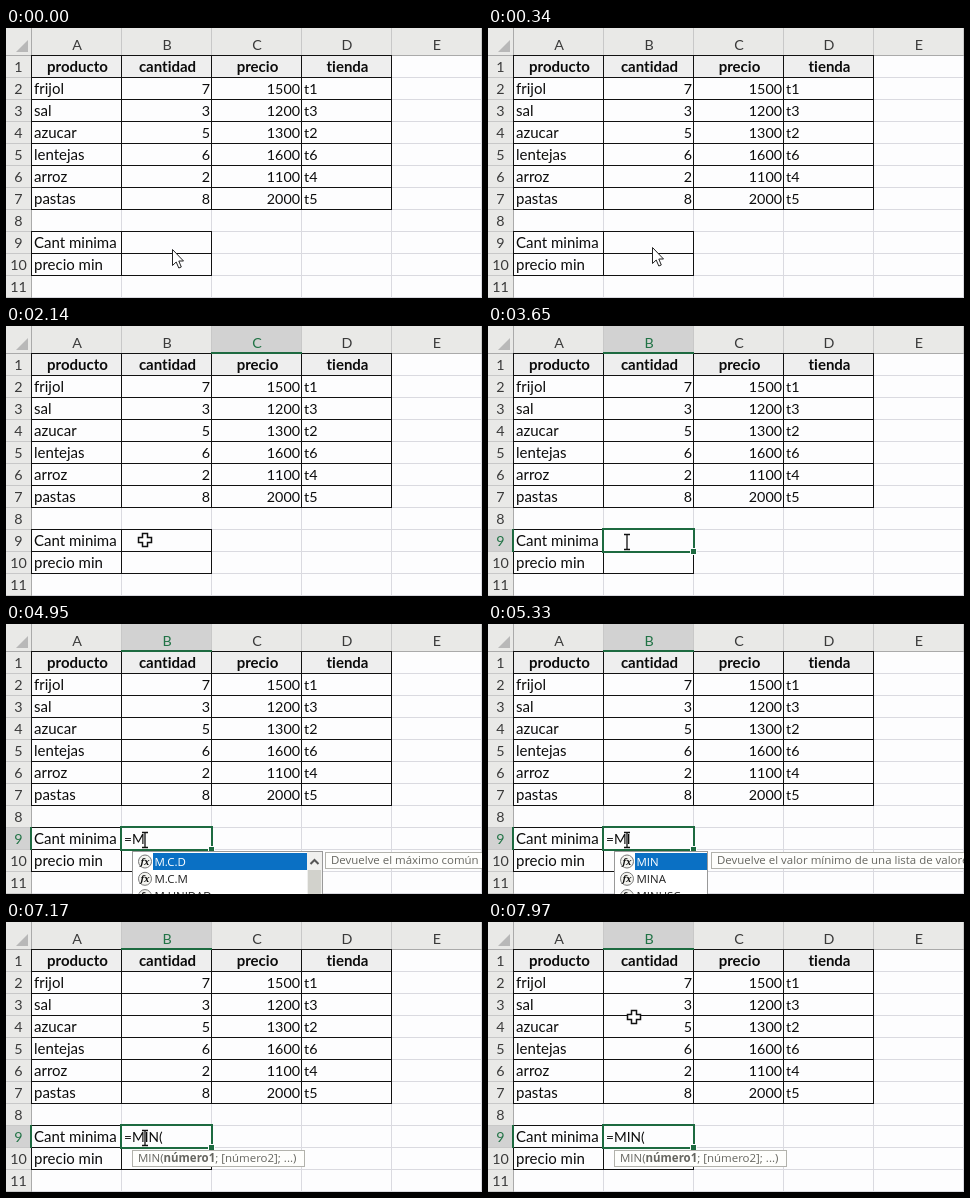
Recreate the animation shown at these times as an HTML page. Size 476x270 px, loop 8000 ms.

```html
<!DOCTYPE html>
<html lang="es">
<head>
<meta charset="utf-8">
<title>Función MIN</title>
<style>
  html, body { margin: 0; width: 100%; height: 100%; overflow: hidden; background: #fdfdfe; }
  svg { display: block; width: 476px; height: 270px; }
  text { font-family: Lato, sans-serif; font-size: 15px; font-variant-ligatures: none; fill: #0c0c0c; white-space: pre; }
  .num { font-size: 14.3px; }
  .head { font-size: 14.3px; fill: #3a3a3a; }
  .on { fill: #217346; }
  .bold { font-weight: 700; }
  .typed { font-size: 13.7px; }
  .ui, .tip { font-family: "Open Sans", sans-serif; font-size: 11.46px; fill: #222; }
  .tip { fill: #666660; }
  .fx { font-family: "Noto Serif", serif; font-size: 9px; font-style: italic; font-weight: 700; }
</style>
</head>
<body>
<svg id="stage" viewBox="0 0 476 270"></svg>
<script>
const LOOP = 8000;
const LEFT = 25, TOP = 27, COL = 90, ROW = 22;
const PAPER = '#fdfdfe', HEADER = '#e9e9e7', TITLES = '#eeeeee', ACTIVE = '#d2d2d2';
const GRID = '#dadae0', GREEN = '#1d6a40';
const colX = c => LEFT + c * COL;
const rowY = r => TOP + r * ROW;
const baseline = r => rowY(r) + 17;

const rect = (x, y, w, h, fill, extra = '') =>
  `<rect x="${x}" y="${y}" width="${w}" height="${h}" fill="${fill}" ${extra}/>`;
const text = (x, y, str, cls = '', anchor = 'start') =>
  `<text x="${x}" y="${y}" class="${cls}" text-anchor="${anchor}">${str}</text>`;
const during = (from, to, body) => `<g data-from="${from}" data-to="${to}">${body}</g>`;
const hline = (x, y, w, color) => rect(x, y, w, 1, color);
const vline = (x, y, h, color) => rect(x, y, 1, h, color);

function columnHead(c, active) {
  const x = colX(c);
  return rect(x + 1, 0, COL - 1, TOP, active ? ACTIVE : HEADER) +
    (active ? rect(x, TOP - 1, COL + 1, 2, GREEN) : '') +
    text(x + COL / 2 + 1, 22, 'ABCDE'[c], 'head' + (active ? ' on' : ''), 'middle');
}

function rowHead(r, active) {
  const y = rowY(r);
  return rect(0, y + 1, LEFT, ROW - 1, active ? ACTIVE : HEADER) +
    (active ? rect(LEFT - 1, y, 2, ROW + 1, GREEN) : '') +
    text(12.5, baseline(r), r + 1, 'head' + (active ? ' on' : ''), 'middle');
}

function borders(c0, r0, cols, rows) {
  let out = '';
  for (let r = 0; r <= rows; r++) out += hline(colX(c0), rowY(r0 + r), cols * COL + 1, '#111');
  for (let c = 0; c <= cols; c++) out += vline(colX(c0 + c), rowY(r0), rows * ROW + 1, '#111');
  return out;
}

function sheet() {
  let out = rect(0, 0, 476, 270, PAPER) + rect(0, 0, 476, TOP, '#c8c8c8') + rect(0, 0, LEFT, 270, '#c8c8c8');
  out += rect(0, 0, LEFT, TOP, HEADER) + '<path d="M22 12V24H10Z" fill="#b8b8b8"/>';
  for (let r = 0; r <= 11; r++) out += hline(LEFT, rowY(r), 451, GRID);
  for (let c = 0; c <= 5; c++) out += vline(colX(c), TOP, 243, GRID);
  for (let c = 0; c < 5; c++) out += columnHead(c);
  for (let r = 0; r < 11; r++) out += rowHead(r);
  out += hline(0, TOP, 476, '#aaa') + vline(LEFT, 0, 270, '#aaa');
  out += rect(LEFT, TOP, 4 * COL, ROW, TITLES) + borders(0, 0, 4, 7) + borders(0, 8, 2, 2);

  ['producto', 'cantidad', 'precio', 'tienda'].forEach((title, c) => {
    out += text(colX(c) + 46.5, baseline(0), title, 'bold', 'middle');
  });
  const items = [
    ['frijol', 7, 1500, 't1'], ['sal', 3, 1200, 't3'], ['azucar', 5, 1300, 't2'],
    ['lentejas', 6, 1600, 't6'], ['arroz', 2, 1100, 't4'], ['pastas', 8, 2000, 't5']
  ];
  items.forEach(([name, amount, price, shop], i) => {
    const y = baseline(i + 1);
    out += text(28, y, name) + text(204, y, amount, 'num', 'end') +
      text(294, y, price, 'num', 'end') + text(298, y, shop, 'num');
  });
  return out + text(28, baseline(8), 'Cant minima') + text(28, baseline(9), 'precio min');
}

const selection = () =>
  rect(0, 0, COL + 1, ROW + 1, 'none', `stroke="${GREEN}" stroke-width="2"`) +
  rect(87, 19, 7, 7, PAPER) + rect(88, 20, 5, 5, GREEN);

function suggestions(right, names, scroll) {
  const x = 126, end = scroll ? right - 15 : right;
  let out = rect(x + .5, 227.5, right - x, 50, '#fff', 'stroke="#999"');
  out += rect(x + 21, 229, end - x - 21, 17, '#0a70c4');
  names.forEach((name, i) => {
    const y = 237.5 + i * 17.3;
    out += `<circle cx="${x + 13}" cy="${y}" r="6.5" fill="#f4f4f0" stroke="#777"/>` +
      text(x + 13, y + 3, 'fx', 'fx', 'middle') +
      `<text x="${x + 22.5}" y="${y + 4.2}" class="ui"${i ? '' : ' style="fill:#fff"'}>${name}</text>`;
  });
  if (scroll) {
    out += rect(end, 228, 15, 42, '#f0f0ee') +
      `<path d="M${end + 3.5} 240l4-4 4 4" fill="none" stroke="#555" stroke-width="2"/>` +
      rect(end + 1, 246, 13, 24, '#d2d2cc');
  }
  return out;
}

const tip = (x, w, str) =>
  rect(x + .5, 228.5, w, 16, '#fefefc', 'stroke="#b2b2ac"') + text(x + 6, 240, str, 'tip');

function typed() {
  const keys = [['=', 3900], ['M', 4780], ['I', 5300], ['N', 5800], ['(', 6850]];
  const spans = keys.map(([ch, at]) => `<tspan data-from="${at}" data-to="${LOOP}">${ch}</tspan>`).join('');
  return text(118, baseline(8), spans, 'typed') +
    during(3900, 4280, vline(127, 207, 15, '#111'));
}

const arrow = '<path d="M.5 .5V16.5L4.2 13 6.8 19 9.3 18 6.8 12H11.5Z" fill="#fff" stroke="#222"/>';
const cross = '<path d="M-2.5-6.5h5v4h4v5h-4v4h-5v-4h-4v-5h4z" fill="#fff" stroke="#111" stroke-width="1.5"/>';
const beam = '<path d="M-3-7.5h2.5l.5.5.5-.5H3M0-7V7M-3 7.5h2.5L0 7l.5.5H3" fill="none" stroke="#111" stroke-width="1.3"/>';

const stage = document.getElementById('stage');
stage.innerHTML = sheet() +
  during(1400, 2600, columnHead(2, true)) +
  during(2600, LOOP, columnHead(1, true) + rowHead(8, true)) +
  `<g id="selection">${during(1400, LOOP, selection())}</g>` + typed() +
  during(4780, 5300,
    suggestions(316, ['M.C.D', 'M.C.M', 'M.UNIDAD'], true) +
    tip(319, 190, 'Devuelve el máximo común divisor')) +
  during(5300, 6850,
    suggestions(219, ['MIN', 'MINA', 'MINUSC']) +
    tip(223, 260, 'Devuelve el valor mínimo de una lista de valores')) +
  during(6850, LOOP, tip(126, 172, 'MIN(<tspan class="bold">número1</tspan>; [número2]; ...)')) +
  `<g id="pointer">${during(0, 1400, arrow)}${during(1400, 3300, cross)}${during(3300, 7470, beam)}${during(7470, LOOP, cross)}</g>`;

const timed = [...stage.querySelectorAll('[data-from]')].map(el =>
  ({ el, from: +el.dataset.from, to: +el.dataset.to }));

// Stops: time, x, y
const movers = {
  pointer: [
    [0, 166, 221], [130, 166, 221], [900, 157, 209], [1300, 157, 209], [1700, 139, 214],
    [3250, 139, 214], [3300, 139, 216], [7350, 139, 216], [7960, 146, 95], [LOOP, 146, 95]
  ],
  selection: [
    [0, colX(2), rowY(11) + 3], [2500, colX(2), rowY(11) + 3], [2800, colX(1), rowY(8)], [LOOP, colX(1), rowY(8)]
  ]
};

function positionAt(path, t) {
  const i = path.findIndex(stop => stop[0] > t);
  const [t0, x0, y0] = path[i - 1], [t1, x1, y1] = path[i];
  const k = (t - t0) / (t1 - t0), e = k * k * (3 - 2 * k);
  return [x0 + (x1 - x0) * e, y0 + (y1 - y0) * e].map(Math.round);
}

function render(now) {
  const t = Math.max(0, now - start) % LOOP;
  for (const { el, from, to } of timed) el.setAttribute('visibility', t >= from && t < to ? 'visible' : 'hidden');
  for (const id in movers)
    document.getElementById(id).setAttribute('transform', `translate(${positionAt(movers[id], t)})`);
  requestAnimationFrame(render);
}

const start = performance.now();
render(start);
</script>
</body>
</html>
```
